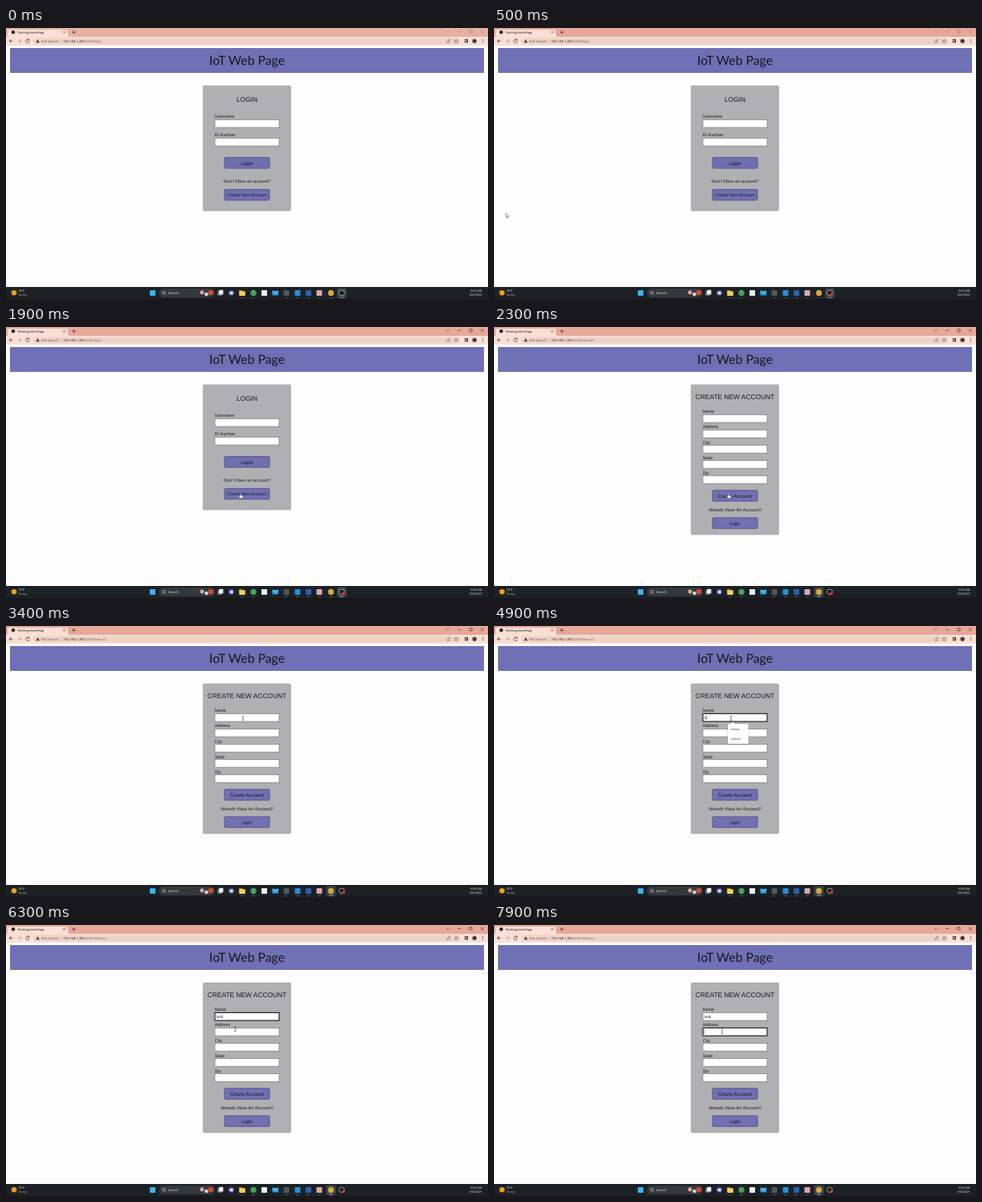
Animation of 600x338 px, one loop 8000 ms. Source, as an HTML page:

```html
<!DOCTYPE html>
<html lang="en">
<head>
<meta charset="utf-8">
<title>IoT Web Page</title>
<style>
html, body { margin: 0; width: 100%; height: 100%; overflow: hidden; background: #fefdfe; }
svg { display: block; width: 100vw; height: 100vh; }
text { text-rendering: geometricPrecision; white-space: pre; }
.ui { font-family: "Open Sans", "Noto Sans", sans-serif; }
.form { font-family: "Liberation Sans", Arial, sans-serif; }
.head { font-family: Lato, "Open Sans", sans-serif; }
</style>
</head>
<body>
<svg id="stage" viewBox="0 0 600 338" preserveAspectRatio="none"></svg>
<script>
const LOOP = 8000;
const INK = '#171719';
const NAME = 'Selb';

const rect = (x, y, w, h, fill, extra = '') =>
  `<rect x="${x}" y="${y}" width="${w}" height="${h}" fill="${fill}" ${extra}/>`;
const dot = (x, y, r, fill, extra = '') =>
  `<circle cx="${x}" cy="${y}" r="${r}" fill="${fill}" ${extra}/>`;
const line = (d, color, width = 0.7, extra = '') =>
  `<path d="${d}" fill="none" stroke="${color}" stroke-width="${width}" ${extra}/>`;
const text = (x, y, size, str, cls = 'ui', fill = INK, extra = '') =>
  `<text x="${x}" y="${y}" font-size="${size}" class="${cls}" fill="${fill}" ${extra}>${str}</text>`;
const centered = (y, size, str, cls) => text(300, y, size, str, cls, INK, 'text-anchor="middle"');
const group = (id, body) => `<g id="${id}">${body}</g>`;

const field = (y, label, id = '') =>
  text(259.8, y - 1.6, 5.3, label, 'form') +
  rect(260, y + 0.3, 80, 9.8, '#fff', `id="${id}" stroke="#77777a" stroke-width=".7"`);

const button = (y, size, label) =>
  rect(272, y, 56, 13.4, '#7070b3', 'rx="1" stroke="#4b4b86" stroke-width=".8"') +
  centered(y + 6.9 + size * 0.34, size, label, 'head');

const card = height =>
  rect(245.3, 72, 109.2, height, '#b0afb1', 'rx="1.5" stroke="#a2a1a4" stroke-width=".6"');

function browser() {
  const icon = '#5b4944';
  return rect(0, 0, 600, 12, '#e5ad9e', 'id="strip"') +
    `<path d="M0 11H1Q2 11 2 9V4Q2 2 4 2H75Q77 2 77 4V9Q77 11 79 11H600V22H0Z" fill="#fadfd5"/>` +
    dot(9, 5.3, 2.2, '#252326') +
    text(14, 6.9, 3.9, 'TestAngularIotApp') +
    line('M71 3.8l2.8 2.8m0-2.8L71 6.6', INK, 0.5) +
    line('M82 5.3h4.6M84.3 3v4.6', INK, 0.6) +
    group('controls',
      line('M548.5 3.6l1.6 1.6 1.6-1.6', INK, 0.6) +
      line('M562 4.5h4M577 2.8h3.2v3.2H577ZM591.2 2.8l3.4 3.4m0-3.4l-3.4 3.4', INK, 0.55)) +
    line('M8.5 16.2H4.2m2-2l-2 2 2 2', INK, 0.65) +
    line('M14.5 16.2h4.3m-2-2l2 2-2 2', '#a28d86', 0.65) +
    line('M28.8 14.9A2.2 2.2 0 1 0 29 17.1M29 13.7v1.6h-1.6', INK, 0.65) +
    rect(34, 12.4, 531, 8, '#efd3c9', 'rx="4"') +
    `<path d="M39.5 14l2.4 4.2h-4.8Z" fill="${icon}"/>` +
    text(44, 17.8, 4.2, 'Not secure', 'ui', icon) +
    line('M68.4 14.2v4.2', '#b89e96', 0.5) +
    `<text x="71" y="17.8" font-size="4.1" class="ui" fill="${INK}">192.168.1.205<tspan id="path" fill="#725d56"></tspan></text>` +
    line('M548.8 15.8v2.4h3.6v-1.4M550 17q.3-2.3 2.9-2.3m-1.2-1.1l1.4 1.1-1.4 1.1', icon, 0.5) +
    line('M560.5 14l.7 1.5 1.7.2-1.3 1.1.4 1.6-1.5-.8-1.5.8.4-1.6-1.3-1.1 1.7-.2Z', icon, 0.5) +
    rect(571, 14, 4, 4.3, '#2a2526') + rect(571.8, 14.8, 1.6, 2.7, '#fadfd5') +
    dot(583.2, 16.2, 2.8, '#68505f') + rect(581.6, 15, 3.2, 2.3, '#2e2431', 'rx="1"') +
    [14.5, 16.2, 17.9].map(y => dot(593.5, y, 0.5, INK)).join('');
}

function page() {
  return rect(0, 22, 600, 301, '#fefdfe') +
    rect(5, 25, 590, 31, '#7070b6') +
    centered(46, 15.8, 'IoT Web Page', 'head') +
    group('loginPage',
      card(156) + centered(92.3, 8.4, 'LOGIN', 'form') +
      field(114, 'Username') + field(137, 'ID Number') +
      button(161.6, 6.5, 'Login') +
      centered(193.3, 5.6, "Don't Have an account?", 'head') +
      button(201.4, 5.4, 'Create New Account')) +
    group('accountPage',
      card(187) + centered(90, 8.4, 'CREATE NEW ACCOUNT', 'form') +
      ['Name', 'Address', 'City', 'State', 'Zip']
        .map((label, i) => field(109 + i * 19.05, label, label)).join('') +
      text(261.2, 115.8, 4.6, '', 'form', '#333', 'id="typed"') +
      rect(261, 111.4, 0.5, 5.6, '#222', 'id="caret"') +
      button(203.8, 6.3, 'Create Account') +
      centered(230, 5.65, 'Already Have An Account?', 'head') +
      button(237.9, 5.4, 'Login')) +
    group('suggest',
      rect(290.4, 121.8, 27, 26, '#000', 'opacity=".2" rx="1.5"') +
      rect(291, 122, 25.8, 25, '#fff', 'rx="1"') +
      `<path d="M294.5 122.2l2.5-2.4 2.5 2.4Z" fill="#fff"/>` +
      text(294.2, 130.3, 3.6, 'selmira', 'form', '#444') +
      text(294.2, 141.6, 3.6, 'selbona', 'form', '#444'));
}

function taskbar() {
  const square = (x, fill, s = 7) => rect(x - s / 2, 330.5 - s / 2, s, s, fill, 'rx=".8"');
  const open = [294, 308, 349, 363, 376.5, 390, 404.5];
  return rect(0, 323, 600, 15, '#1c2125') +
    dot(10, 330.2, 3.3, '#f39a22') +
    text(15.4, 329.4, 3.7, '53°F', 'ui', '#fff') +
    text(15.4, 334.2, 3.6, 'Sunny', 'ui', '#c3c6c8') +
    square(182.5, '#35b4ee') +
    rect(190.5, 325, 69, 11, '#34393d', 'rx="5.5"') +
    dot(196.3, 330, 1.6, 'none', 'stroke="#e5e5e5" stroke-width=".6"') +
    line('M197.5 331.2l1.5 1.5', '#e5e5e5') +
    text(201.8, 332, 4.1, 'Search', 'ui', '#e6e6e6') +
    dot(244, 329.8, 2.5, '#dca59b') + dot(249.5, 332, 2.3, '#d8d4cf') + dot(255, 330, 3.2, '#d24a31') +
    rect(263.3, 328.2, 5.2, 5.6, '#777d82') + rect(265.2, 326.8, 5.2, 5.6, '#edf0f2') +
    dot(280.5, 330.4, 3.3, '#6264bd') + rect(278.8, 329.3, 3.5, 2.4, '#fff', 'rx=".5"') +
    rect(290.2, 327.2, 4, 2, '#d99c24') + rect(290.2, 328.2, 7.6, 5.7, '#f7ce56', 'rx=".6"') +
    group('chromeLit', rect(398.6, 324.4, 12, 12.2, '#3c4246', 'rx="1.5"')) +
    group('recorderLit', rect(412, 324.4, 12, 12.2, '#3c4246', 'rx="1.5"')) +
    dot(308, 330.4, 3.6, '#42a35a') +
    square(321.5, '#e8edf0') +
    rect(331.4, 327.7, 7.8, 5.8, '#249ee4', 'rx=".7"') + line('M331.6 328l3.7 3 3.7-3', '#bfe8ff') +
    square(349, '#50575c') +
    square(363, '#248fda') +
    square(376.5, '#285fb4') +
    square(390, '#d7a7b4') +
    dot(404.5, 330.4, 3.6, '#d8a63b') +
    dot(418, 330.4, 3.4, '#17191b', 'stroke="#c9cccd" stroke-width=".7"') +
    dot(419.8, 332.2, 1.9, '#e32930', 'id="recording"') +
    open.map(x => rect(x - 1.6, 335.9, 3.2, 0.7, '#8f9699', 'rx=".3"')).join('') +
    rect(402, 335.8, 5, 0.8, '#6bb8e8', 'id="chromeLine"') +
    rect(415.5, 335.8, 5, 0.8, '#6bb8e8', 'id="recorderLine"') +
    text(592.3, 329.4, 3.75, '9:56 AM', 'ui', '#f2f2f2', 'text-anchor="end"') +
    text(592.3, 334.2, 3.75, '5/3/2023', 'ui', '#f2f2f2', 'text-anchor="end"');
}

const pointers =
  group('arrow', `<path d="M0 0V5.2L1.3 4.1 2.2 6 3.1 5.6 2.3 3.8H3.9Z" fill="#fff" stroke="#222" stroke-width=".45"/>`) +
  group('hand', `<path d="M-.7 0Q0-.8.7 0V2L2.7 2.5Q3.3 2.8 3.1 3.7L2.5 5.6H-.6L-2.2 3.2Q-2-.1-.7 3Z" fill="#fff" stroke="#222" stroke-width=".4"/>`) +
  group('beam', line('M-1.2-2.8Q0-2.8 0-2.2Q0-2.8 1.2-2.8M0-2.4V2.4M-1.2 2.8Q0 2.8 0 2.2Q0 2.8 1.2 2.8', '#222', 0.55));

document.getElementById('stage').innerHTML = page() + browser() + taskbar() + group('pointer', pointers);

const el = id => document.getElementById(id);
const show = (id, on) => el(id).setAttribute('display', on ? 'inline' : 'none');

// Pointer stops: time, x, y
const stops = [
  [300, 2, 243], [500, 14.8, 231], [900, 8, 222], [1050, 40, 195], [1250, 190, 95],
  [1400, 330, 46], [1550, 420, 110], [1700, 340, 185], [1850, 292, 208], [2600, 292, 208],
  [2850, 293, 190], [3250, 295, 115], [5800, 295, 115], [6250, 285.5, 129.5],
  [6500, 284, 133], [8000, 284, 133]
];

function pointerAt(t) {
  const i = Math.max(1, stops.findIndex(s => s[0] >= t));
  const [t0, x0, y0] = stops[i - 1], [t1, x1, y1] = stops[i];
  const u = Math.min(1, Math.max(0, (t - t0) / (t1 - t0)));
  const k = u * u * (3 - 2 * u);
  return [x0 + (x1 - x0) * k, y0 + (y1 - y0) * k];
}

function focus(id, on) {
  el(id).setAttribute('stroke', on ? '#17171b' : '#77777a');
  el(id).setAttribute('stroke-width', on ? 1.1 : 0.7);
}

function render(t) {
  const account = t >= 2200;
  const active = t >= 1900;
  const chrome = t >= 2000;
  show('loginPage', !account);
  show('accountPage', account);
  el('path').textContent = account ? ':4200/new-acc' : ':4200/login';
  el('strip').setAttribute('fill', t < 200 ? '#e5b1a3' : '#e7a899');
  el('controls').setAttribute('opacity', active ? 1 : 0.4);

  show('chromeLit', chrome);
  show('chromeLine', chrome);
  show('recorderLit', !chrome);
  show('recorderLine', !chrome);
  show('recording', t >= 300);

  const inName = t >= 3800 && t < 6600, inAddress = t >= 6600;
  focus('Name', inName);
  focus('Address', inAddress);
  const count = [4700, 5300, 5500, 5700].filter(at => t >= at).length;
  el('typed').textContent = NAME.slice(0, count);
  show('suggest', t >= 4800 && t < 5500);

  const since = t - (inAddress ? 6600 : 3800);
  show('caret', (inName || inAddress) && since % 1000 < 500);
  el('caret').setAttribute('x', inAddress || !count ? 261.2 : 261.5 + el('typed').getComputedTextLength());
  el('caret').setAttribute('y', inAddress ? 130.4 : 111.4);

  const [x, y] = pointerAt(t);
  const hand = t >= 1800 && t < 2700;
  const beam = t >= 3200;
  show('pointer', t >= 300);
  el('pointer').setAttribute('transform', `translate(${x.toFixed(2)} ${y.toFixed(2)})`);
  show('hand', hand);
  show('beam', beam);
  show('arrow', !hand && !beam);
}

const start = performance.now();
function tick(now) {
  render(Math.max(0, now - start) % LOOP);
  requestAnimationFrame(tick);
}
render(0);
requestAnimationFrame(tick);
</script>
</body>
</html>
```
